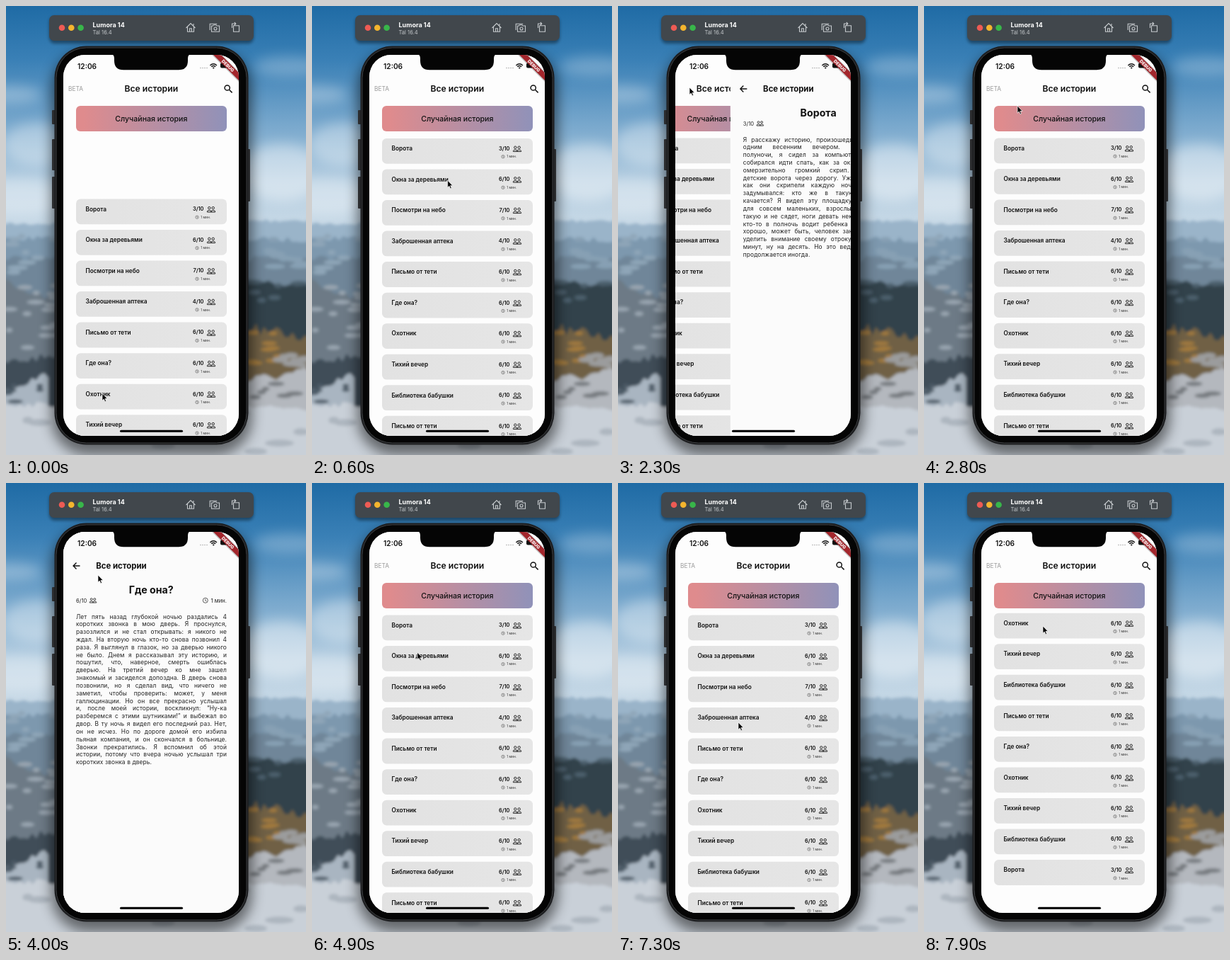
An HTML page that plays this animation: 424 px wide and 634 px high, repeating every 8 s.

```html
<!DOCTYPE html>
<html lang="ru">
<head>
<meta charset="utf-8">
<style>
html, body { margin: 0; width: 100%; height: 100%; overflow: hidden; }
svg { display: block; width: 424px; height: 634px; font-family: Inter, "Noto Sans", sans-serif; }
.line { display: flex; justify-content: space-between; height: 10.84px;
  font: 8.4px/10.84px Inter, "Noto Sans", sans-serif; letter-spacing: .1px; color: #222; white-space: nowrap; }
.line:last-child { justify-content: flex-start; gap: .3em; }
</style>
</head>
<body>
<svg viewBox="0 0 424 634">
  <defs>
    <linearGradient id="sky" x2="0" y2="1">
      <stop stop-color="#1f6ba5"/><stop offset=".12" stop-color="#3a80b6"/>
      <stop offset=".28" stop-color="#7faccf"/><stop offset=".39" stop-color="#b5cee1"/>
      <stop offset=".5" stop-color="#c9dae7"/>
    </linearGradient>
    <linearGradient id="random"><stop offset=".05" stop-color="#df8b8d"/><stop offset="1" stop-color="#9092b9"/></linearGradient>
    <linearGradient id="card"><stop stop-color="#e2e2e2"/><stop offset="1" stop-color="#e6e6e6"/></linearGradient>
    <filter id="soft" x="-50%" y="-50%" width="200%" height="200%"><feGaussianBlur stdDeviation="9"/></filter>
    <filter id="shade"><feGaussianBlur stdDeviation="2"/></filter>
    <clipPath id="screen"><rect x="81" y="69" width="248" height="538" rx="31"/></clipPath>
    <clipPath id="below"><rect x="81" y="181" width="248" height="430"/></clipPath>
    <g id="people" fill="none" stroke="#222" stroke-width="1">
      <circle cx="-2.7" cy="-2.2" r="1.7"/><circle cx="2.7" cy="-2.2" r="1.7"/>
      <path d="M-5.6 3.6v-1q0-1.4 2.9-1.4t2.7 1.4v1zM0 3.6v-1q0-1.4 2.7-1.4t2.9 1.4v1z"/>
    </g>
    <g id="clock" fill="none" stroke="#333" stroke-width=".8"><circle r="3.5"/><path d="M0-2V.2L1.6 1.2"/></g>
  </defs>

  <rect width="424" height="634" fill="url(#sky)"/>
  <g fill="#fff" filter="url(#soft)">
    <ellipse cx="5" cy="125" rx="45" ry="12" opacity=".3"/>
    <ellipse cx="45" cy="195" rx="50" ry="30" opacity=".35"/>
    <ellipse cx="20" cy="270" rx="70" ry="26" opacity=".35"/>
    <ellipse cx="400" cy="85" rx="50" ry="14" opacity=".25"/>
    <ellipse cx="390" cy="235" rx="60" ry="40" opacity=".4"/>
  </g>
  <g id="land" filter="url(#shade)"></g>

  <rect x="64" y="64" width="284" height="570" rx="52" opacity=".5" filter="url(#soft)"/>
  <rect x="61" y="15" width="289" height="38" rx="8" opacity=".4" filter="url(#shade)"/>
  <rect x="61" y="13" width="289" height="36" rx="7" fill="#41474c"/>
  <circle cx="79" cy="30.7" r="4.3" fill="#ee5b54"/>
  <circle cx="92.3" cy="30.7" r="4.3" fill="#f4b52e"/>
  <circle cx="105.6" cy="30.7" r="4.3" fill="#38b64a"/>
  <g fill="none" stroke="#c6cacd" stroke-width="1.1">
    <path d="M254.5 31l6.5-6.5 6.5 6.5M256.5 29.5v6.7h9v-6.7M259.6 36v-4.3h2.8V36M265 25v2.5"/>
    <path d="M290.5 28h2l1-1.3h3.4l1 1.3h3.6v8.3h-11zM288.2 34v-8.8h10"/><circle cx="296" cy="32" r="2"/>
    <path d="M321.5 27.8h8v8.4h-8zM319.5 31v-6h5M322.8 23l2 2-2 2"/>
  </g>

  <g fill="#2b2c2e">
    <rect x="65" y="147" width="6" height="20" rx="1"/><rect x="65" y="188" width="6" height="44" rx="1"/>
    <rect x="65" y="241" width="6" height="45" rx="1"/><rect x="340" y="202" width="5" height="74" rx="1"/>
  </g>
  <rect x="68.5" y="56.5" width="274" height="563" rx="45" fill="#1c1d1f"/>
  <rect x="71" y="59" width="269" height="558" rx="42.5" fill="#050505" stroke="#3d3f41"/>
  <rect x="81" y="69" width="248" height="538" rx="31" fill="#fdfdfd"/>

  <g clip-path="url(#screen)">
    <g id="list">
      <rect x="81" y="69" width="248" height="538" fill="#fdfdfd"/>
      <g clip-path="url(#below)"><g id="cards"></g></g>
      <rect x="99" y="141" width="213" height="36" rx="6" fill="url(#random)"/>
      <g fill="none" stroke="#111" stroke-width="1.5"><circle cx="312.7" cy="115.5" r="3.6"/><path d="M315.4 118.2l4.2 4.2"/></g>
    </g>
    <g id="stories"></g>
    <g fill="#111">
      <g fill="#aaa"><circle cx="275" cy="87.5" r=".8"/><circle cx="278" cy="87.5" r=".8"/><circle cx="281" cy="87.5" r=".8"/><circle cx="284" cy="87.5" r=".8"/></g>
      <path d="M293.2 88.8l-1.6-1.7q1.6-1.3 3.2 0z"/>
      <path d="M288.4 83.9q4.8-4.3 9.6 0M290.2 85.8q3-2.5 6 0" fill="none" stroke="#111" stroke-width="1.4"/>
      <rect x="303" y="80.5" width="13" height="7" rx="2"/>
      <rect x="161" y="598.7" width="89" height="3" rx="1.5" fill="#000"/>
    </g>
    <g transform="translate(329 69) rotate(45)">
      <rect x="-30" y="17.8" width="60" height="7.6" opacity=".6" filter="url(#shade)"/>
      <rect x="-30" y="17.8" width="60" height="7.6" fill="#a3262c"/>
      <text y="24" text-anchor="middle" font-size="6.3" font-weight="800" fill="#fff">DEBUG</text>
    </g>
  </g>
  <path d="M148 68q5 0 5 6v3.2q0 13 13 13h78q13 0 13-13v-3.2q0-6 5-6z" fill="#050505"/>
  <g id="chrome"></g>
  <path id="cursor" d="M0 0v10.2l2.3-2.1 1.6 3.6 1.7-.7-1.6-3.5h3.2z" stroke="#fff" stroke-width=".7"/>
</svg>

<script>
const $ = id => document.getElementById(id);
const LOOP = 8000, SLIDE = 500, WIDTH = 248, PITCH = 43.55;

const titles = ['Ворота', 'Окна за деревьями', 'Посмотри на небо', 'Заброшенная аптека', 'Письмо от тети',
  'Где она?', 'Охотник', 'Тихий вечер', 'Библиотека бабушки'];
const scores = [3, 6, 7, 4, 6, 6, 6, 6, 6];
const order = [0, 1, 2, 3, 4, 5, 6, 7, 8, 4, 5, 6, 7, 8, 0];

const stories = [
  { title: 0, open: 750, close: 2250, text: `Я расскажу историю, произошедшую со мной
одним весенним вечером. Было около
полуночи, я сидел за компьютером и уже
собирался идти спать, как за окном раздался
омерзительно громкий скрип. Это были
детские ворота через дорогу. Уже две недели
как они скрипели каждую ночь. Я иногда
задумывался: кто же в такую пору там
качается? Я видел эту площадку, там ворота
для совсем маленьких, взрослый человек в
такую и не сядет, ноги девать некуда. Неужели
кто-то в полночь водит ребенка поиграть? Ну
хорошо, может быть, человек занятой и хочет
уделить внимание своему отроку. Ну на пять
минут, ну на десять. Но это ведь по полночи
продолжается иногда.` },
  { title: 5, open: 3420, close: 4350, text: `Лет пять назад глубокой ночью раздались 4
коротких звонка в мою дверь. Я проснулся,
разозлился и не стал открывать: я никого не
ждал. На вторую ночь кто-то снова позвонил 4
раза. Я выглянул в глазок, но за дверью никого
не было. Днем я рассказывал эту историю, и
пошутил, что, наверное, смерть ошиблась
дверью. На третий вечер ко мне зашел
знакомый и засиделся допоздна. В дверь снова
позвонили, но я сделал вид, что ничего не
заметил, чтобы проверить: может, у меня
галлюцинации. Но он все прекрасно услышал
и, после моей истории, воскликнул: “Ну-ка
разберемся с этими шутниками!” и выбежал во
двор. В ту ночь я видел его последний раз. Нет,
он не исчез. Но по дороге домой его избила
пьяная компания, и он скончался в больнице.
Звонки прекратились. Я вспомнил об этой
истории, потому что вчера ночью услышал три
коротких звонка в дверь.` },
  { title: 1, open: 5250, close: 6150, text: `Один человек заблудился в лесу. Он долго
блуждал и, в конце концов, в сумерках
натолкнулся на хижину. Внутри никого не было,
и он решил лечь спать. Но он долго не мог
заснуть, потому что на стенах висели портреты
каких-то людей, и ему казалось, что они
зловеще смотрят на него. В конце концов он
заснул от усталости. Утром его разбудил яркий
солнечный свет. На стенах не было никаких
картин. Это были окна.` },
];

// Time, x, y of the pointer tip
const pointer = [
  [0, 136, 547], [200, 136, 547], [700, 198, 212], [1300, 201, 214], [1600, 201, 214], [2100, 101, 115],
  [2350, 101, 115], [2800, 132, 141], [3200, 150, 420], [3450, 150, 420], [4000, 130, 130], [4250, 101, 115],
  [4400, 101, 115], [4950, 150, 242], [5250, 150, 242], [5700, 100, 112], [6200, 100, 112],
  [6850, 170, 338], [7330, 170, 338], [7650, 168, 202], [8000, 168, 202],
];

// Text whose y is the vertical middle
const label = (s, x, y, size, weight = 400, anchor = 'start', fill = '#111') =>
  `<text x="${x}" y="${y + size * .36}" font-size="${size}" font-weight="${weight}" text-anchor="${anchor}" fill="${fill}">${s}</text>`;
const icon = (id, x, y, scale) => `<use href="#${id}" transform="translate(${x} ${y}) scale(${scale})"/>`;
const add = (id, markup) => $(id).insertAdjacentHTML('beforeend', markup);

let seed = 7;
const rand = () => (seed = seed * 16807 % 2147483647) / 2147483647;

// Rough-edged slope from (x0, y0) to (x1, y1), filled down to the bottom
function slope(x0, y0, x1, y1, rough, fill) {
  let d = `M${x0} 650`;
  for (let i = 0, n = Math.ceil((x1 - x0) / 6); i <= n; i++)
    d += `L${x0 + (x1 - x0) * i / n} ${y0 + (y1 - y0) * i / n + (rand() - .5) * rough}`;
  add('land', `<path d="${d}V650z" fill="${fill}"/>`);
}
function patches(n, x, y, w, h, size, fill) {
  for (let i = 0; i < n; i++)
    add('land', `<ellipse cx="${x + rand() * w}" cy="${y + rand() * h}" rx="${size * (.5 + rand())}" ry="${size * .35}" fill="${fill}"/>`);
}

slope(-10, 308, 434, 302, 6, '#9ab4c9');
slope(-10, 328, 434, 330, 8, '#7d98ae');
slope(-10, 355, 434, 358, 10, '#6f8699');
patches(9, 0, 325, 70, 55, 10, '#8fa6b8');
patches(9, 345, 325, 80, 50, 10, '#87a0b4');
slope(-10, 385, 90, 425, 10, '#6d7a86');
patches(16, -5, 395, 80, 100, 9, '#99a5b0');
slope(-10, 505, 90, 490, 12, '#3f4d59');
slope(-10, 545, 60, 520, 10, '#a9b5c1');
patches(6, 0, 535, 50, 25, 8, '#4d5b67');
slope(330, 385, 434, 395, 10, '#33424c');
patches(6, 345, 390, 80, 40, 10, '#4c5f6c');
slope(330, 452, 434, 470, 16, '#6f6044');
patches(9, 340, 460, 45, 50, 8, '#a37a3c');
patches(8, 375, 475, 50, 40, 11, '#9b9c9d');
slope(330, 530, 434, 515, 14, '#b4b8be');
patches(6, 345, 530, 80, 35, 9, '#777b80');
slope(-10, 562, 434, 568, 8, '#c9d0d8');
patches(12, 0, 575, 424, 55, 14, '#adb6bf');

add('chrome',
  label('Lumora 14', 122.5, 27, 9, 700, 'start', '#fff') +
  label('Tal 16.4', 122.5, 37, 7.6, 400, 'start', '#c2c6c9') +
  label('12:06', 101, 85, 10.2, 600));

add('list', label('BETA', 88, 117, 8.4, 400, 'start', '#999') +
  label('Все истории', 205.3, 117, 12.2, 600, 'middle') +
  label('Случайная история', 205.3, 159, 10.6, 500, 'middle'));

order.forEach((k, i) => {
  const y = 186.4 + i * PITCH;
  add('cards', `<rect x="99" y="${y}" width="213" height="35.8" rx="6.5" fill="url(#card)"/>` +
    label(titles[k], 112.5, y + 14.2, 8.3, 600) +
    label(scores[k] + '/10', 279.5, y + 14.2, 7.4, 600, 'end') + icon('people', 290, y + 15, 1) +
    icon('clock', 270, y + 25.8, .62) + label('1 мин.', 289, y + 25.8, 4.7, 400, 'end', '#333'));
});

for (const s of stories) {
  const lines = s.text.split('\n').map(line =>
    `<div class="line">${line.split(' ').map(w => `<span>${w}</span>`).join(' ')}</div>`).join('');
  add('stories', `<g><rect x="81" y="69" width="${WIDTH}" height="538" fill="#fbfbfb"/>
    <path d="M104.5 117h-9M99.5 112.6L95.1 117l4.4 4.4" fill="none" stroke="#111" stroke-width="1.4"/>` +
    label('Все истории', 127.3, 117, 11.4, 700) +
    label(titles[s.title], 205.3, 151, 14.2, 700, 'middle') +
    label(scores[s.title] + '/10', 99, 165.8, 7.6, 400, 'start', '#222') + icon('people', 123, 166, .85) +
    icon('clock', 281.8, 165.8, 1) + label('1 мин.', 312, 165.8, 7.7, 400, 'end', '#222') +
    `<foreignObject x="99" y="183.5" width="213" height="230"><div>${lines}</div></foreignObject></g>`);
  s.page = $('stories').lastElementChild;
}

const clamp = p => Math.max(0, Math.min(1, p));
const smooth = p => p * p * (3 - 2 * p);
const settle = p => 1 - (1 - clamp(p)) ** 3.5;
const move = (el, x, y) => el.setAttribute('transform', `translate(${x.toFixed(2)} ${y.toFixed(2)})`);

function scrollAt(t) {
  if (t < 1000) {
    const k = t * .012;
    return -86 * (1 + k) * Math.exp(-k);
  }
  return 264 * smooth(clamp((t - 7330) / 550));
}

function draw() {
  const t = performance.now() % LOOP;
  let shown = 0;
  for (const s of stories) {
    const p = settle((t - s.open) / SLIDE) - settle((t - s.close) / SLIDE);
    s.page.style.display = p > 0 ? '' : 'none';
    move(s.page, WIDTH * (1 - p), 0);
    shown = Math.max(shown, p);
  }
  move($('list'), -WIDTH / 3 * shown, 0);
  move($('cards'), 0, -scrollAt(t));

  const i = pointer.findIndex(k => k[0] > t);
  const [t0, x0, y0] = pointer[i - 1], [t1, x1, y1] = pointer[i];
  const p = smooth((t - t0) / (t1 - t0));
  move($('cursor'), x0 + (x1 - x0) * p, y0 + (y1 - y0) * p);
  requestAnimationFrame(draw);
}
draw();
</script>
</body>
</html>
```
